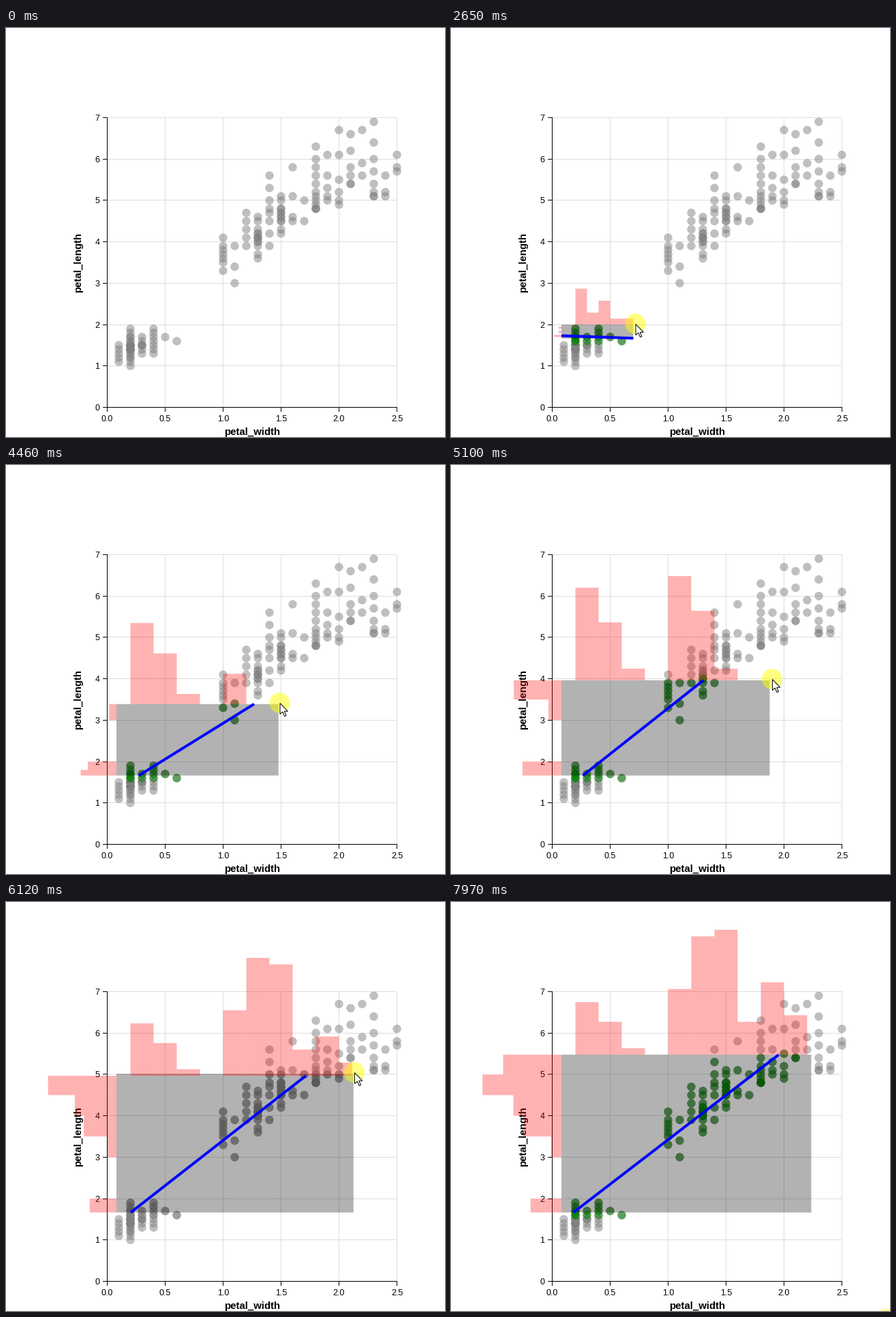
Write a matplotlib script that moves like this. It is 644 px wide and 600 px high and loops after 8.05 s.

```python
import math

import matplotlib.pyplot as plt
import numpy as np
from matplotlib.animation import FuncAnimation
from matplotlib.collections import PolyCollection
from matplotlib.patches import Circle, Polygon, Rectangle

W, H, DPI = 644, 600, 64
PT = 72 / DPI
LOOP, INTERVAL = 8050, 35
FONT = "Liberation Sans"
LEFT, RIGHT, TOP, BOTTOM = 148.5, 573.5, 131.5, 556.5

# width: (shortest, longest, count), in tenths
COLUMNS = {
    1: (11, 15, 5), 2: (10, 19, 29), 3: (13, 17, 7), 4: (13, 19, 7),
    5: (17, 17, 1), 6: (16, 16, 1),
    10: (33, 41, 7), 11: (30, 39, 3), 12: (39, 47, 5), 13: (36, 46, 13),
    14: (39, 56, 8), 15: (42, 51, 12), 16: (45, 58, 4), 17: (45, 50, 2),
    18: (48, 63, 12), 19: (50, 61, 5), 20: (49, 67, 6), 21: (54, 66, 6),
    22: (56, 67, 3), 23: (51, 69, 8), 24: (51, 56, 3), 25: (57, 61, 3),
}


def lengths(width, low, high, n):
    """Spread n lengths: wide petals crowd the low end, others the middle."""
    u = np.linspace(0, 1, n)
    if width >= 16:
        share = u ** 2
    else:
        c = 2 * u - 1
        share = (1 + c * abs(c) ** (n / 15)) / 2
    return np.round(low + (high - low) * share)


DATA = np.array([(w, n) for w, col in COLUMNS.items()
                 for n in lengths(w, *col)]) / 10


def px(x):
    return LEFT + (RIGHT - LEFT) * x / 2.5


def py(y):
    return BOTTOM - (BOTTOM - TOP) * y / 7


def ix(p):
    return (p - LEFT) * 2.5 / (RIGHT - LEFT)


def iy(p):
    return (BOTTOM - p) * 7 / (BOTTOM - TOP)


def crisp(p):
    return round(p - 0.5) + 0.5


DOTS = np.column_stack([px(DATA[:, 0]), py(DATA[:, 1])])

# pointer key points: (time or drag step, x, y)
HOVER = np.array([(220, 354, 536), (380, 192, 463), (680, 192, 463),
                  (990, 173, 471), (1310, 162, 456)])
DRAG = np.array([(0, 162, 456), (5, 200, 459), (23, 341, 409),
                 (37, 401.5, 349), (45, 471, 314), (58, 511, 250),
                 (67, 528.5, 224)])
LEAVE = np.array([(7190, 529, 224), (7660, 653, 640)])
PRESS, RELEASE, LAST_CLICK = 1550, 7270, 7970
STEP, LAST_STEP = 78.5, 68
ANCHOR = (162, 455.5)
ARROW = np.array([(0, 0), (0, 16), (3.8, 12.6), (6.6, 19), (9, 18),
                  (6.3, 11.8), (11.4, 11.8)]) + 0.5


def along(path, t):
    return np.array([np.interp(t, path[:, 0], path[:, k]) for k in (1, 2)])


def pointer(t, step):
    """Position of the pointer (or None) and whether the button is down."""
    if t < HOVER[0, 0]:
        return None, False
    if t < PRESS:
        return along(HOVER, t), False
    if t < RELEASE:
        return along(DRAG, step), True
    if t < LAST_CLICK:
        return along(LEAVE, t), False
    return np.array([638, 612]), True


def brush_box(step):
    x, y = along(DRAG, step)
    return ANCHOR[0], x, min(y, ANCHOR[1]), max(y, ANCHOR[1])


def nice_step(span, count):
    raw = span / count
    power = 10 ** math.floor(math.log10(raw))
    err = raw / power
    for limit, factor in ((50, 10), (10, 5), (2, 2)):
        if err >= math.sqrt(limit):
            return power * factor
    return power


def histogram(values, lo, hi):
    """Bins clipped to [lo, hi], as (start, end, share of the tallest)."""
    size = nice_step(hi - lo, math.ceil(math.log2(len(values))) + 1)
    inside = values[(values >= lo) & (values <= hi)]
    if not len(inside):
        return []
    bins, counts = np.unique(np.floor(inside / size + 1e-9), return_counts=True)
    return [(max(lo, b * size), min(hi, (b + 1) * size), n / counts.max())
            for b, n in zip(bins, counts)]


def rect(x0, x1, y0, y1):
    return [(x0, y0), (x1, y0), (x1, y1), (x0, y1)]


def hit(box, margin=5.5):
    x0, x1, y0, y1 = box
    x, y = DOTS.T
    return ((x > x0 - margin) & (x < x1 + margin)
            & (y > y0 - margin) & (y < y1 + margin))


def marginal_bars(box, picked):
    x0, x1, y0, y1 = box
    if not len(picked) or x1 - x0 < 1 or y1 - y0 < 0.5:
        return []
    tall, wide = (x1 - x0) / 2, (y1 - y0) / 2
    bars = [rect(px(a), px(b), y0 - tall * f, y0)
            for a, b, f in histogram(picked[:, 0], ix(x0), ix(x1))]
    bars += [rect(x0 - wide * f, x0, py(b), py(a))
             for a, b, f in histogram(picked[:, 1], iy(y1), iy(y0))]
    return bars


def fit_line(box, dots):
    """Least squares line clipped to the box."""
    x0, x1, y0, y1 = box
    if len(dots) < 2 or np.ptp(dots[:, 0]) == 0:
        return [], []
    mx, my = dots.mean(axis=0)
    dx, dy = (dots - (mx, my)).T
    slope = (dx * dy).sum() / (dx * dx).sum()
    lo, hi = x0, x1
    if abs(slope) > 1e-6:
        a, b = sorted(mx + (y - my) / slope for y in (y0, y1))
        lo, hi = max(lo, a), min(hi, b)
    if lo >= hi:
        return [], []
    return [lo, hi], [my + slope * (x - mx) for x in (lo, hi)]


fig = plt.figure(figsize=(W / DPI, H / DPI), dpi=DPI, facecolor="white")
ax = fig.add_axes([0, 0, 1, 1])
ax.set_xlim(0, W)
ax.set_ylim(H, 0)
ax.axis("off")


def line(x, y, color, z, width=1):
    return ax.plot(x, y, color=color, lw=width * PT, zorder=z, snap=False,
                   solid_capstyle="butt")[0]


def label(x, y, text, size, **kw):
    ax.text(x, y, text, fontsize=size * PT, family=FONT, color="black",
            va="baseline", zorder=4, **kw)


def dots(color, z):
    # one colour per dot keeps the centres off the pixel grid
    return ax.scatter(*DOTS.T, s=(12.4 * PT) ** 2, linewidths=0, alpha=0.5,
                      color=[color] * len(DOTS), zorder=z)


for v in np.arange(0, 2.6, 0.5):
    x = crisp(px(v))
    line([x, x], [TOP, BOTTOM], "#dddddd", 1)
    line([x, x], [BOTTOM, BOTTOM + 6.5], "black", 3)
    label(x, 577, f"{v:.1f}", 12.5, ha="center")
for v in range(8):
    y = crisp(py(v))
    line([LEFT, RIGHT], [y, y], "#dddddd", 1)
    line([LEFT - 6.5, LEFT], [y, y], "black", 3)
    label(137.5, y + 4.5, str(v), 12.5, ha="right")
line([LEFT, LEFT], [TOP - 0.5, BOTTOM + 0.5], "black", 3)
line([LEFT, RIGHT + 0.5], [BOTTOM, BOTTOM], "black", 3)
label(361, 597, "petal_width", 15, ha="center", weight="bold")
label(110, 344, "petal_length", 15, ha="center", weight="bold",
      rotation=90, rotation_mode="anchor")

dots("#808080", 5)
chosen = dots("#008000", 6)
brush = ax.add_patch(Rectangle((0, 0), 0, 0, fc="black", alpha=0.3, lw=0,
                               zorder=7, snap=False))
bars = ax.add_collection(PolyCollection([], facecolors="red", alpha=0.3,
                                        linewidths=0, zorder=8, snap=False))
trend = line([], [], "blue", 9, 4)
halo = ax.add_patch(Circle((0, 0), 15, fc="yellow", alpha=0.5, lw=0, zorder=10))
arrow = ax.add_patch(Polygon(ARROW, fc="white", ec="black", lw=PT, zorder=11))


def update(i):
    t = (i + 1) * INTERVAL
    step = min(max((t - PRESS) // STEP, 0), LAST_STEP)
    settled = step == LAST_STEP

    tip, pressed = pointer(t, step)
    arrow.set_visible(tip is not None)
    halo.set_visible(pressed)
    if tip is not None:
        arrow.set_xy(ARROW + tip)
        halo.center = tuple(tip)

    active = t >= PRESS
    for artist in (brush, bars, trend, chosen):
        artist.set_visible(active)
    if active:
        # the derived marks trail the brush while a redraw is pending
        pending = t < RELEASE and (step < 8 or settled or step % 6 == 4)
        lag = 0 if settled else 0.4
        x0, x1, y0, y1 = brush_box(step - lag)
        brush.set_bounds(x0, y0, x1 - x0, y1 - y0)

        late = 0.6 if pending and not settled and step > 8 else 0
        box = brush_box(step - lag - late)
        mask = hit(box)
        bars.set_verts(marginal_bars(box, DATA[mask]))
        trend.set_data(*fit_line(box, DOTS[mask]))
        chosen.set_offsets(DOTS[mask])
        chosen.set_facecolor(["#808080" if pending else "#008000"] * len(DOTS))
    return arrow, halo, brush, bars, trend, chosen


anim = FuncAnimation(fig, update, frames=LOOP // INTERVAL, interval=INTERVAL,
                     repeat=True, repeat_delay=0, blit=False)
plt.show()
```
